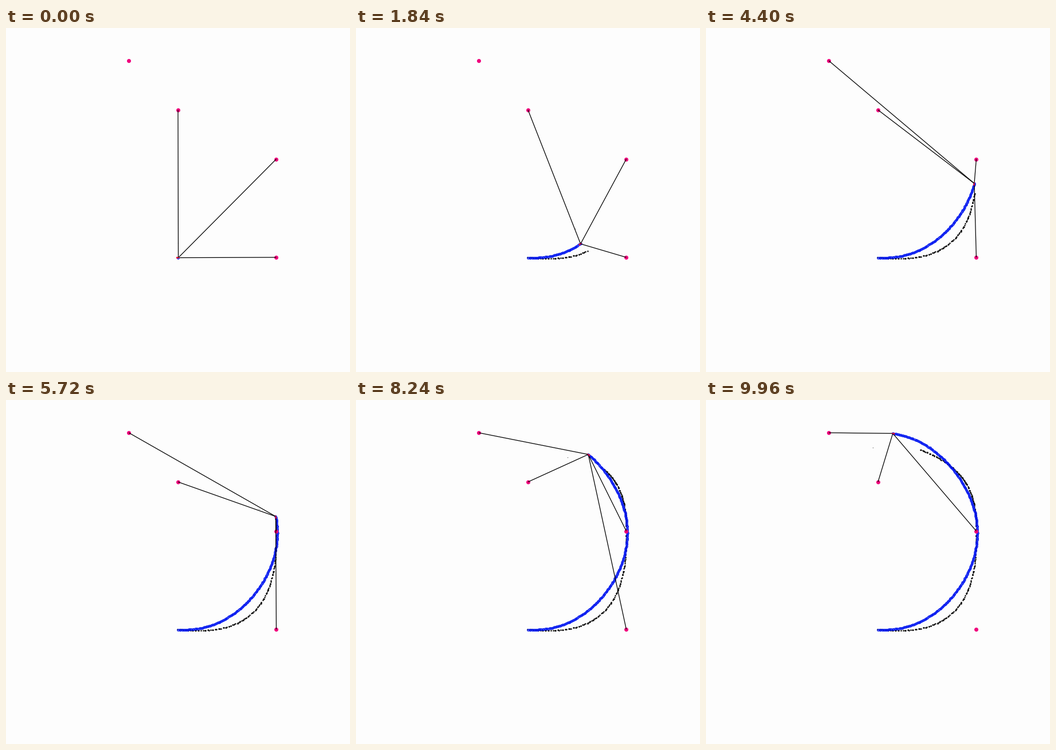
Recreate the animation shown at these times as a matplotlib script. Size 600 px wide and 600 px high, loop 10 s.

```python
import numpy as np
import matplotlib.pyplot as plt
from matplotlib.animation import FuncAnimation
from matplotlib.collections import LineCollection

SIZE, DPI = 600, 100
FRAMES, INTERVAL = 250, 40
PT = 72 / DPI              # points per pixel
UNIT = SIZE / 7            # pixels per world unit
CENTRE = np.array([300, 228.6])
SENSOR_RANGE = 4 * UNIT
LANDMARKS = CENTRE + UNIT * np.array([[2, 2], [2, 0], [0, -1], [-1, -2]])

rng = np.random.default_rng(4)


def polar(angle, radius):
    """Points around the centre, the angle anticlockwise from the bottom."""
    return CENTRE + np.column_stack([radius * np.sin(angle),
                                     radius * np.cos(angle)])


def bezier(count, a, b, c, d):
    """Points along a cubic curve, evenly spaced in its parameter."""
    t = np.linspace(0, 1, count, endpoint=False)[:, None]
    a, b, c, d = map(np.array, (a, b, c, d))
    return ((1 - t)**3 * a + 3 * (1 - t)**2 * t * b
            + 3 * (1 - t) * t**2 * c + t**3 * d)


# Estimated path: steady turn on a slightly wobbling circle
angle = 0.012 * np.arange(FRAMES) + 0.003
radius = 172 + 1.8 * np.sin(2 * angle) + 1.15 * np.sin(5 * angle)
robot = polar(angle, radius)
trail = robot + rng.normal(0, 0.18, robot.shape)

# Dead reckoning: first outside the circle, then falling inside it
HALF = 132
drift = np.vstack([
    bezier(HALF, (301, 400), (420, 414), (476, 360), (471, 228)),
    bezier(FRAMES - HALF, (471, 228), (474, 150), (440, 112), (372, 86))])
heading = np.gradient(drift, axis=0)
heading /= np.linalg.norm(heading, axis=1, keepdims=True)
drift += heading * rng.normal(0, 1.1, (FRAMES, 1))
drift += rng.normal(0, 0.2, drift.shape)

# Faint speck that runs ahead on an inner circle
speck_path = polar(1.07 * angle, 146)

fig = plt.figure(figsize=(SIZE / DPI, SIZE / DPI), dpi=DPI,
                 facecolor="#fdfdfd")
ax = fig.add_axes([0, 0, 1, 1])
ax.set(xlim=(0, SIZE), ylim=(SIZE, 0))
ax.axis("off")


def dots(diameter, color, z, **kw):
    line, = ax.plot([], [], "o", ms=diameter * PT, color=color, zorder=z,
                    **{"mew": 0, **kw})
    line.set_snap(False)
    return line


drift_dots = dots(2.5, "black", 1)
trail_dots = dots(3.2, "#0014f0", 2, mfc="none", mew=1.3 * PT)
landmark_dots = dots(7, "#f0007c", 3)
landmark_dots.set_data(*LANDMARKS.T)
speck = dots(1.3, "#555555", 3)
beams = LineCollection([], colors="black", linewidths=1.25 * PT, zorder=4)
ax.add_collection(beams)
pointer = plt.Polygon(np.zeros((3, 2)), fc="#f01030", ec="none", zorder=5)
ax.add_patch(pointer)


def draw(i):
    here = robot[i]
    drift_dots.set_data(*drift[:i + 1].T)
    trail_dots.set_data(*trail[:i + 1].T)
    speck.set_data(*speck_path[i:i + 1].T)
    seen = np.linalg.norm(LANDMARKS - here, axis=1) < SENSOR_RANGE
    beams.set_segments([[here, mark] for mark in LANDMARKS[seen]])
    ahead = np.array([np.cos(angle[i]), -np.sin(angle[i])])
    side = np.array([-ahead[1], ahead[0]])
    tail = here - 3.5 * ahead
    pointer.set_xy([here + 3.5 * ahead, tail + 1.6 * side, tail - 1.6 * side])
    return drift_dots, trail_dots, speck, beams, pointer


anim = FuncAnimation(fig, draw, frames=FRAMES, interval=INTERVAL,
                     repeat=True, repeat_delay=0)
plt.show()
```
